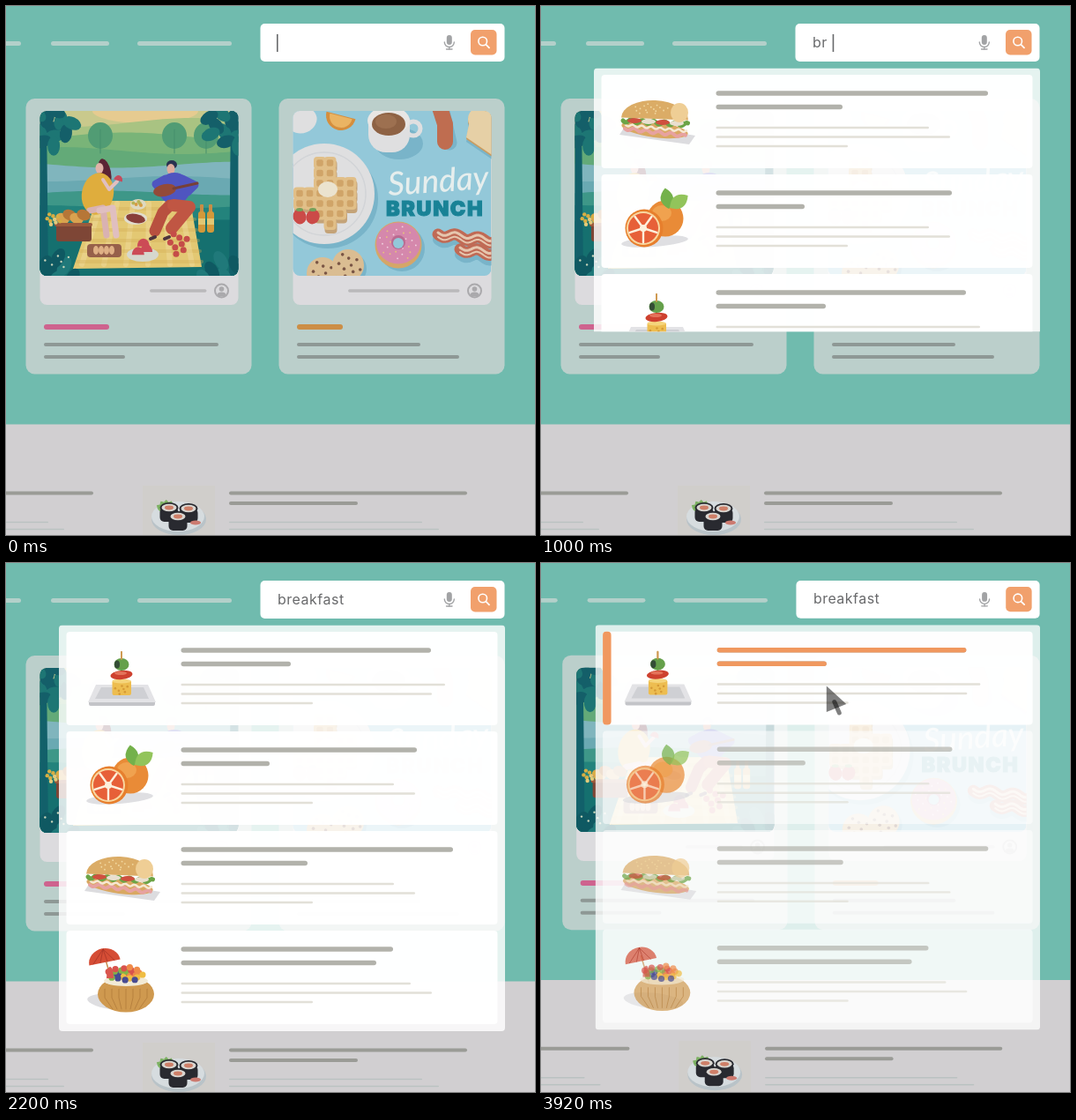
These frames come from a looping animation (600 px wide and 600 px high, 3960 ms). An HTML page with a canvas:

```html
<!DOCTYPE html>
<html lang="en">
<head>
<meta charset="utf-8">
<title>Instant search</title>
<style>
html, body { margin: 0; width: 100%; height: 100%; overflow: hidden; background: #70bbae; }
canvas { display: block; width: 600px; height: 600px; }
</style>
</head>
<body>
<canvas id="stage" width="600" height="600"></canvas>
<script>
const c = document.getElementById('stage').getContext('2d');
const LOOP = 3960, STEP = 40;

const clamp = v => Math.max(0, Math.min(1, v));
const mix = (a, b, p) => a + (b - a) * p;
const span = (t, from, to) => clamp((t - from) / (to - from));
function ease(t, from, to) {
  const u = span(t, from, to);
  return u < .5 ? 4 * u ** 3 : 1 - 4 * (1 - u) ** 3;
}

function box(x, y, w, h, r, fill) {
  c.fillStyle = fill;
  c.beginPath();
  c.roundRect(x, y, w, h, r);
  c.fill();
}
const bar = (x1, x2, y, w, fill) => box(x1, y - w / 2, x2 - x1, w, w / 2, fill);

function oval(x, y, rx, ry, fill, turn = 0, from = 0, to = 2 * Math.PI) {
  c.fillStyle = fill;
  c.beginPath();
  c.ellipse(x, y, rx, ry, turn, from, to);
  c.fill();
}
const dot = (x, y, r, fill) => oval(x, y, r, r, fill);
const dome = (x, y, rx, ry, fill, turn = 0) => oval(x, y, rx, ry, fill, turn, Math.PI);

function ring(x, y, r, w, color, to = 2 * Math.PI) {
  c.beginPath();
  c.arc(x, y, r, 0, to);
  c.strokeStyle = color;
  c.lineWidth = w;
  c.stroke();
}
function trace(points) {
  c.beginPath();
  for (let i = 0; i < points.length; i += 2) c.lineTo(points[i], points[i + 1]);
}
function poly(fill, ...points) {
  trace(points);
  c.fillStyle = fill;
  c.fill();
}
function stroke(color, w, ...points) {
  trace(points);
  c.strokeStyle = color;
  c.lineWidth = w;
  c.lineCap = c.lineJoin = 'round';
  c.stroke();
}
function wave(x1, x2, y, slope, amp, freq, w, color) {
  const points = [];
  for (let x = x1; x <= x2; x += 1.5)
    points.push(x, y + (x - x1) * slope + amp * Math.sin((x - x1) * freq));
  stroke(color, w, ...points);
}
function leaf(x, y, length, turn, fill) {
  const dx = Math.cos(turn) * length, dy = Math.sin(turn) * length;
  c.beginPath();
  c.moveTo(x, y);
  c.quadraticCurveTo(x + dx / 2 - dy * .6, y + dy / 2 + dx * .6, x + dx, y + dy);
  c.quadraticCurveTo(x + dx / 2 + dy * .6, y + dy / 2 - dx * .6, x, y);
  c.fillStyle = fill;
  c.fill();
}
// Sunflower spread over an ellipse.
function scatter(n, x, y, rx, ry, draw) {
  for (let i = 0; i < n; i++) {
    const r = Math.sqrt((i + .5) / n), a = i * 2.4;
    draw(x + rx * r * Math.cos(a), y + ry * r * Math.sin(a), i);
  }
}
function clipped(x, y, w, h, r, draw) {
  c.save();
  c.beginPath();
  c.roundRect(x, y, w, h, r);
  c.clip();
  draw();
  c.restore();
}

function hill(y, amp, phase, fill) {
  const points = [263, 307, 38, 307];
  for (let x = 38; x <= 263; x += 5) points.push(x, y + amp * Math.sin(x / 45 + phase));
  poly(fill, ...points);
}

function woman() {
  oval(112, 189, 7, 16, '#5b2434', -.2);
  oval(106, 184, 4.5, 6, '#e2b3a8');
  oval(104, 213, 18, 24, '#dfad3d', .2);
  for (const [shift, skin] of [[0, '#d9b2b2'], [11, '#e0bfc0']])
    stroke(skin, 7, 95 + shift, 232, 110 + shift, 229, 114 + shift, 260);
  stroke('#e0bfc0', 4, 110, 197, 117, 208, 126, 199);
  dome(127, 198, 5, 6, '#c64b5c', .3);
}

function man() {
  oval(188, 180, 6, 5, '#293150');
  oval(187, 185, 4.5, 6, '#dfac9d');
  oval(191, 207, 18, 18, '#4f55c0');
  stroke('#4f55c0', 9, 181, 196, 170, 202, 178, 212);
  stroke('#4f55c0', 9, 200, 196, 214, 203, 206, 211);
  stroke('#b8503f', 13, 186, 226, 178, 234, 169, 255);
  stroke('#c05643', 14, 190, 226, 208, 228, 188, 252);
  oval(180, 209, 13, 7, '#934a38', -.2);
  stroke('#774037', 3, 190, 207, 217, 201);
  for (const x of [164, 180]) stroke('#4e353d', 4, x, 264, x + 5, 262);
}

function picnic() {
  const layers = ['#a9c382', '#79b478', '#63aa78', '#80b5bd', '#6aa9b2', '#3e9788', '#23837c', '#15706f'];
  box(38, 119, 225, 188, 0, '#c9c98c');
  oval(158, 119, 60, 14, '#e6cb90');
  layers.forEach((fill, i) => hill(132 + i * 16, 5 - i / 2, i * 1.7, fill));
  for (const x of [107, 191, 227]) {
    oval(x, 147, 14, 15, '#519c74');
    stroke('#468f6d', 1, x, 140, x, 167);
  }
  poly('#e3c873', 102, 221, 209, 221, 222, 296, 76, 298);
  c.globalAlpha = .35;
  for (let i = 0; i < 6; i++) {
    stroke('#f3e2ac', 6, 108 + i * 18, 224, 86 + i * 25, 293);
    stroke('#d0ad55', 4, 101 - i * 4, 230 + i * 12, 212 + i * 2, 230 + i * 12);
  }
  c.globalAlpha = 1;
  woman();
  man();

  for (let i = 0; i < 4; i++) oval(64 + i * 8, 241 - i % 2 * 4, 8, 6, i % 2 ? '#b67637' : '#d9a24f', .4);
  box(57, 247, 40, 20, 3, '#7e4636');
  bar(55, 98, 248, 4, '#9c5a3c');
  box(92, 270, 39, 15, 4, '#96604a');
  for (let i = 0; i < 4; i++) oval(102 + i * 6, 277, 3, 5, '#dfb085');
  oval(150, 225, 9, 6, '#dfd9c0');
  scatter(5, 150, 224, 6, 3, (x, y, i) => dot(x, y, 2, i % 2 ? '#d69b42' : '#b8b254'));
  oval(147, 241, 13, 7, '#e1ddce');
  oval(147, 241, 11, 5, '#883e39', .2);
  oval(155, 282, 18, 8, '#d6d8ce');
  scatter(3, 155, 276, 10, 7, (x, y) => dome(x, y + 3, 7, 9, '#cc4b56'));
  scatter(8, 196, 270, 13, 13, (x, y) => dot(x, y, 3.5, '#c54d48'));
  for (const x of [222, 232]) {
    box(x - 2, 225, 4, 12, 1, '#c98d45');
    box(x - 4, 233, 8, 24, 3, '#d3993a');
    box(x - 4, 241, 8, 7, 0, '#e2c773');
  }

  for (const [edge, side] of [[38, 1], [263, -1]]) {
    const x = d => edge + side * d;
    stroke('#12606a', 16, x(0), 119, x(2), 306);
    scatter(14, x(8), 138, 30, 24, (lx, ly, i) => oval(lx, ly, 11, 7, i % 2 ? '#1d7674' : '#145f69', i));
    scatter(12, x(4), 303, 42, 20, (lx, ly, i) => oval(lx, ly, 7, 12, i % 2 ? '#20797a' : '#0f5962', side * .5));
  }
  scatter(9, 53, 242, 9, 7, (x, y, i) => dot(x, y, 2.2, i % 3 ? '#d8ae43' : '#e2ca7b'));
  scatter(6, 58, 290, 16, 10, (x, y) => dot(x, y, 1.2, '#c8d5ba'));
}

// Texas out of waffle squares: panhandle, broad middle, tapering south.
const inWaffle = (x, y) =>
  y < 190 ? x > 350 && x < 374 : y < 226 ? x > (y < 206 ? 350 : 332) && x < 402 : Math.abs(x - 368) < (252 - y) * .95;

function waffle() {
  const cells = (dx, dy, size, r, fill) => {
    for (let y = 178; y < 252; y += 11.5)
      for (let x = 333; x < 405; x += 11.5)
        if (inWaffle(x, y)) box(x - size / 2 + dx, y - size / 2 + dy, size, size, r, fill);
  };
  cells(1, 4, 14, 4, '#c4a378');
  cells(0, 0, 14, 4, '#e1bf88');
  cells(0, 0, 7.5, 2, '#d0a468');
  oval(365, 208, 11, 9, '#ebe3cf');
}

function brunch() {
  const SHADE = '#79b4c9', WHITE = '#dfdfe0';
  box(325, 119, 225, 188, 0, '#93c8d9');
  oval(365, 219, 57, 56, SHADE);
  dot(361, 213, 57, WHITE);
  ring(361, 213, 47, 1.5, '#d2d4d7');
  waffle();
  for (const x of [333, 348]) {
    oval(x, 239, 7.5, 8.5, '#cb4a48', (x - 340) / 20);
    oval(x, 231, 4, 2, '#75a15b');
  }
  oval(336, 130, 17, 14, WHITE, -.4);
  oval(380, 124, 17, 17, '#d58e3d', .25, 0, Math.PI);
  oval(380, 125, 13, 13, '#eab463', .25, 0, Math.PI);

  oval(446, 156, 27, 18, SHADE);
  ring(462, 139, 8, 5, WHITE);
  box(411, 124, 47, 42, [6, 6, 20, 20], WHITE);
  oval(434, 130, 24, 16, '#e8e6e4');
  oval(434, 134, 19, 13, '#8e6244');
  oval(431, 131, 12, 8, '#9d7050');
  stroke(SHADE, 17, 494, 115, 503, 155);
  stroke('#bf6d50', 18, 491, 112, 498, 134, 498, 154);
  for (const [shift, fill] of [[5, SHADE], [2, '#c99d62'], [0, '#e6d0a6']]) {
    dot(537, 128 + shift, 13, fill);
    poly(fill, 528, 120 + shift, 560, 120 + shift, 560, 175 + shift, 522, 149 + shift);
  }

  dot(449, 275, 26, SHADE);
  dot(445, 271, 26.5, '#d5a668');
  oval(445, 269, 25, 23.5, '#d588ac');
  scatter(26, 445, 269, 22, 20, (x, y, i) => dot(x, y, .9, i % 2 ? '#efd2df' : '#e6c778'));
  dot(445, 268, 8, '#b96b91');
  dot(445, 269, 6, '#93c8d9');
  for (const [x, y] of [[490, 259], [515, 276]]) {
    const strip = (dy, w, fill) => wave(x, 556, y + dy, .12, 2.5, .24, w, fill);
    strip(6, 12, SHADE);
    strip(0, 13, '#c06a55');
    strip(-2, 3, '#e6c6ae');
    strip(3, 2, '#e6c6ae');
  }
  for (const [x, y] of [[359, 303], [388, 294]]) {
    dot(x + 3, y + 4, 18, SHADE);
    dot(x, y, 18, '#dabd92');
    scatter(9, x, y, 15, 15, (px, py) => dot(px, py, 1.8, '#795545'));
  }
  c.save();
  c.translate(434, 215);
  c.rotate(-.07);
  c.fillStyle = '#e6eeed';
  c.font = 'italic 500 37px Lato, sans-serif';
  c.fillText('Sunday', 0, 0);
  c.restore();
  c.fillStyle = c.strokeStyle = '#198296';
  c.lineWidth = 1;
  c.lineJoin = 'miter';
  c.font = '900 23.5px Inter, sans-serif';
  c.letterSpacing = '1.6px';
  c.fillText('BRUNCH', 431, 238);
  c.strokeText('BRUNCH', 431, 238);
  c.letterSpacing = '0px';
}

function card(x, art, accent, accentEnd, ends, footStart) {
  box(x, 105, 256, 312.5, 10, '#bbcfcb');
  box(x + 16, 119, 225, 220, 8, '#dcdbde');
  clipped(x + 16, 119, 225, 187, 8, art);
  bar(footStart, x + 205, 323, 3.5, '#bab9bb');
  dot(x + 222, 323, 8.5, '#aaa9ac');
  dot(x + 222, 323, 6.5, '#dcdbde');
  dot(x + 222, 321, 2.8, '#aaa9ac');
  oval(x + 222, 327, 4.7, 2.5, '#aaa9ac');
  bar(x + 20.5, accentEnd, 364, 6, accent);
  ends.forEach((end, i) => bar(x + 20.5, end, 384 + i * 14, 4, '#8e9895'));
}

function sushi() {
  box(155, 544, 82, 82, 0, '#d0cecb');
  oval(196, 582, 31, 18, '#b9c3c8');
  oval(195, 579, 30, 17, '#d6dcdf');
  for (let i = 0; i < 4; i++) leaf(182, 573, 13, -2.6 + i * .5, '#7db263');
  for (const [x, y] of [[185, 569], [207, 570], [195, 579]]) {
    box(x - 10.5, y, 21, 16, 5, '#292a30');
    oval(x, y, 10.5, 6, '#292a30');
    oval(x, y, 8.5, 4.2, '#d9d6d1');
    oval(x, y, 5, 2.4, '#ce7f68');
  }
  oval(215, 586, 6, 2.5, '#cc7a70');
}

function page() {
  box(-20, -20, 640, 500, 0, '#70bbae');
  box(-20, 474.5, 640, 150, 0, '#d1cfd1');
  for (const [a, b] of [[-20, 17], [51, 117], [149, 256]]) bar(a, b, 42.5, 5, '#b3d0ca');
  card(22.5, picnic, '#ce638e', 117, [241, 135], 163);
  card(309.5, brunch, '#cc8e46', 382, [470, 514], 388);
  const ink = '#9a9b96', faint = '#bac2c1';
  bar(-20, 99, 552.5, 4, ink);
  bar(253, 523, 552.5, 4, ink);
  bar(253, 399, 564, 4, ink);
  for (let i = 0; i < 2; i++) {
    bar(-20, 48 + i * 18, 585.5 + i * 8, 1.6, faint);
    bar(253, 472 + i * 19, 585.5 + i * 8, 1.6, faint);
  }
  sushi();
}

// Dishes take the row's top edge as y = 0.
function sandwich() {
  poly('#dcdcdf', 89, 68, 97, 56, 175, 69, 168, 79);
  oval(129, 62, 38, 9, '#d9a862', .13);
  wave(95, 165, 61, .12, 1.6, .45, 4, '#e7a2a0');
  wave(96, 165, 57, .1, 1.2, .6, 2.5, '#f6e8d2');
  wave(93, 167, 52, .06, 1.8, .5, 5, '#6ca446');
  for (let i = 0; i < 4; i++) oval(106 + i * 16, 52 + i, 8, 3, i % 2 ? '#e9dfcf' : '#cf503f');
  dome(129, 50, 38, 21, '#dbac66', .04);
  oval(157, 43, 10, 11, '#efce95');
  scatter(16, 124, 39, 22, 6, (x, y) => dot(x, y, .9, '#f2d9a1'));
}

function tangerine() {
  oval(129, 76, 38, 6, '#dfdfe2', -.08);
  dot(141, 50, 20.5, '#e98b37');
  oval(137, 44, 11, 9, '#f0a24f');
  leaf(145, 39, 24, -1.75, '#74b14b');
  leaf(146, 38, 25, -.6, '#92c45b');
  dot(117, 61, 21.5, '#e77f2d');
  dot(116, 61, 19, '#f9d7a0');
  dot(116, 61, 17, '#e76038');
  for (let i = 0; i < 5; i++) {
    const a = (i + .25) * Math.PI * .4;
    stroke('#fdf0dc', 2.4, 116, 61, 116 + Math.cos(a) * 16, 61 + Math.sin(a) * 16);
  }
  dot(116, 61, 4, '#fdf0dc');
}

function skewer() {
  box(94, 78, 75, 6, 2, '#c3c4c8');
  poly('#e3e3e6', 102, 60, 161, 60, 170, 80, 93, 80);
  poly('#cfd0d4', 108, 63, 156, 63, 162, 76, 101, 76);
  stroke('#cf9a51', 1.8, 131, 23, 131, 57);
  box(120.5, 55, 21.5, 17, 2, '#edbd50');
  oval(131, 56, 10.5, 2.5, '#f5d57c');
  scatter(7, 131, 65, 9, 6, (x, y) => dot(x, y, 1.3, '#d69a36'));
  oval(131, 49, 12.5, 5, '#ce412f', -.1);
  oval(130, 47, 7, 2, '#e4735a');
  oval(131, 37, 8.5, 7, '#65a04b');
  oval(126, 37, 3, 4.5, '#344d36');
  stroke('#cf9a51', 1.8, 131, 23, 131, 31);
}

function coconut() {
  const fruit = ['#d9534c', '#83b349', '#484b91', '#efbd43', '#ef8b49'];
  oval(126, 81, 34, 9, '#dedee1', .1);
  stroke('#ca9157', 1.6, 112, 30, 121, 60);
  dome(112, 36, 18, 16, '#d54d35', -.2);
  for (let i = 0; i < 4; i++) stroke('#a93527', .8, 110, 21, 99 + i * 8, 38 - i * 1.5);
  oval(136, 72, 32, 20.5, '#cf994f');
  oval(136, 57, 25, 6, '#f2ead5');
  scatter(26, 136, 49, 21, 8, (x, y, i) => dot(x, y, 3.6, fruit[i * 3 % 5]));
  dome(118, 54, 4, 13, '#d9574e');
  for (let i = -3; i <= 3; i++) stroke('#b27c3c', .8, 136 + i * 8, 66, 136 + i * 8, 76, 136 + i * 5, 89);
}

const rows = [
  { id: 'C', draw: coconut, titles: [439, 420], lines: [459, 483] },
  { id: 'S', draw: sandwich, titles: [507, 342], lines: [440, 464] },
  { id: 'T', draw: tangerine, titles: [466, 299], lines: [440, 464] },
  { id: 'K', draw: skewer, titles: [482, 323], lines: [498, 483] },
];
const orders = ['STKC', 'TKSC', 'KTSC'];

function slot(id, t) {
  const [first, second, third] = orders.map(order => order.indexOf(id));
  return mix(mix(first, second, ease(t, 1160, 1560)), third, ease(t, 1600, 2000));
}

function row({ id, draw, titles, lines }, t, dim) {
  const hot = id === 'K', fade = hot ? 0 : dim;
  c.save();
  c.translate(0, 78 + slot(id, t) * 113);
  c.globalAlpha = .97 - .4 * fade;
  box(68.5, 0, 489, 106, 4, '#fff');
  c.globalAlpha = 1 - .3 * fade;
  draw();
  const drawTitles = fill => titles.forEach((end, i) => bar(198.5, end, 21 + i * 15.5, 5.5, fill));
  drawTitles('#b2b2ab');
  [...lines, 348].forEach((end, i) => bar(198.5, end, 60 + i * 10.5, 2.5, '#e2e0d8'));
  if (hot) {
    c.globalAlpha = ease(t, 2760, 2900);
    drawTitles('#f0985f');
    box(68.5, 0, 9.5, 106, 4, '#f0985f');
  }
  c.restore();
}

function panel(t) {
  const open = ease(t, 800, 1160), dim = span(t, 2800, 3300);
  if (!open) return;
  clipped(60, 70.5, 506, 460.5 * open, 0, () => {
    c.globalAlpha = mix(.82, .77, dim);
    box(60, 70.5, 506, 460.5, 4, '#fff');
    c.globalAlpha = 1;
    rows.forEach(r => row(r, t, dim));
  });
}

function search(t) {
  const INK = '#68696b', ICON = '#a2a3a5';
  box(288.5, 20, 277, 43, 5, '#fff');
  const letters = Math.max(0, Math.floor((t - 720) / 120));
  c.fillStyle = INK;
  c.font = '16px Inter, sans-serif';
  c.letterSpacing = '0.5px';
  c.fillText('breakfast'.slice(0, letters), 308, 46.5);
  c.letterSpacing = '0px';
  if (t < 400 || t >= 600 && t < 1920)
    box(mix(307, 384, span(t, 610, 1880)), 32, 1.6, 20, 0, INK);
  box(499.8, 33, 6, 11, 3, ICON);
  ring(502.8, 41, 5.5, 1.4, ICON, Math.PI);
  stroke(ICON, 1.4, 502.8, 47, 502.8, 49);
  stroke(ICON, 1.4, 499.5, 49, 506, 49);
  box(527, 27, 29.5, 28.5, 5, '#f1a06c');
  ring(540.7, 40, 4.8, 1.6, '#fff');
  stroke('#fff', 1.8, 544.3, 43.7, 548, 47.3);
}

function pointer(t) {
  if (t < 2300) return;
  const p = ease(t, 2300, 2800);
  c.save();
  c.globalAlpha = 1 - .5 * span(t, 3840, 3920);
  c.translate(mix(470, 323, p), mix(610, 140, p));
  poly('#000', 0, 0, 0, 29.5, 22.5, 20.5);
  stroke('#000', 5, 9, 18, 14.5, 30.5);
  c.restore();
}

function paint(t) {
  const zoom = 1 - .003 * span(t, 3840, 3920) ** 2;
  c.setTransform(zoom, 0, 0, zoom, 600 * (1 - zoom), 0);
  page();
  panel(t);
  search(t);
  pointer(t);
}

const start = performance.now();
function tick() {
  const t = (performance.now() - start) % LOOP;
  paint(Math.floor(t / STEP) * STEP);
  requestAnimationFrame(tick);
}
tick();
</script>
</body>
</html>
```
